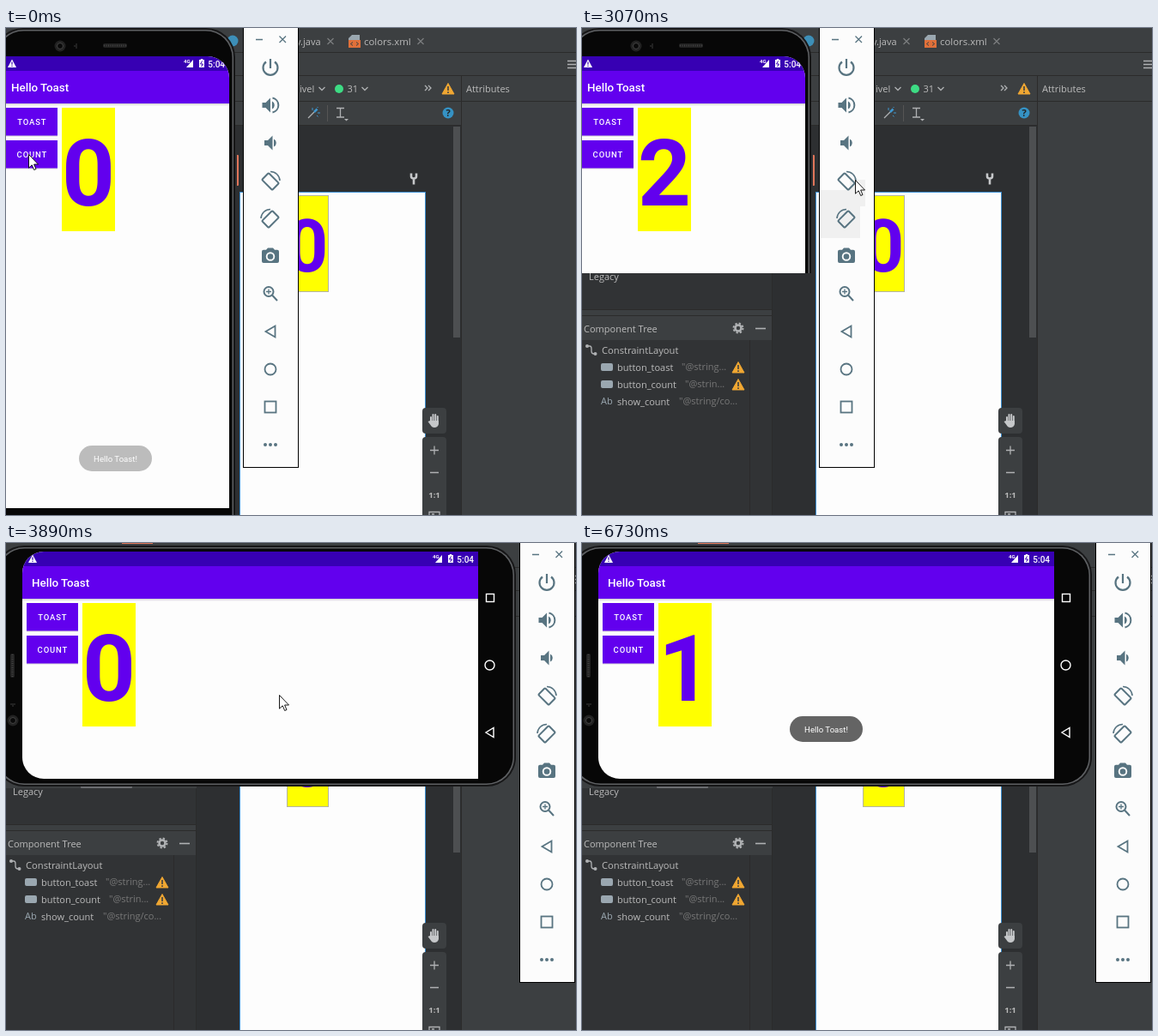
An HTML page that plays this animation: 664x568 px, repeating every 7720 ms.

```html
<!DOCTYPE html>
<html lang="en">
<head>
<meta charset="utf-8">
<title>Hello Toast</title>
<style>
@property --p { syntax: "<number>"; inherits: true; initial-value: 0; }
html, body { margin: 0; width: 100%; height: 100%; overflow: hidden; background: #2b2d30; }
svg { display: block; width: 664px; height: 568px; }
text { font-family: "Open Sans", "Noto Sans", sans-serif; font-size: 11px; fill: #bbb; }
text.app { font-family: Roboto, "Noto Sans", sans-serif; font-weight: 500; fill: #fff; }
text.title { font-size: 13.4px; }
text.btn { font-size: 9.5px; letter-spacing: .85px; text-anchor: middle; }
text.clock { font-size: 10px; text-anchor: end; }
text.net { font-size: 6px; font-weight: 700; }
text.note { font-size: 9.6px; font-weight: 400; text-anchor: middle; }
text.digit { font: 700 108px Roboto, "Noto Sans", sans-serif; fill: #6200ee; text-anchor: middle; }
text.dim { fill: #787878; }
.line { fill: none; stroke: #afb1b3; stroke-width: 1.3; }
.nav { fill: none; stroke: #fff; stroke-width: 1.4; }
.tool { fill: none; stroke: #587481; stroke-width: 2; }
.tool .solid { fill: #587481; stroke: none; }

/* every change is a hard step on one shared clock */
.a { animation: 7720ms step-end infinite; }
.cursor { animation-name: cursor; }
.upright { animation-name: upright; }
.sideways { animation-name: sideways; }
.settled { animation-name: settled; }
.turning { animation-name: turning, spin; }
.tree { animation-name: tree; }
.bar { animation-name: bar; }
.hover1 { animation-name: hover1; }
.hover2 { animation-name: hover2; }
.up0 { animation-name: up0; }
.up1 { animation-name: up1; }
.up2 { animation-name: up2; }
.side0 { animation-name: side0; }
.side1 { animation-name: side1; }
.press1 { animation-name: press1; }
.press2 { animation-name: press2; }
.press3 { animation-name: press3; }
.toast1 { animation-name: toast1; }
.toast2 { animation-name: toast2; }

.turn { transform: translate(297.5px, 141.5px) rotate(calc(-90deg * (1 - var(--p)))); }
.grow { transform: scale(calc(1 + 1.098 * var(--p)), calc(1 - .5234 * var(--p))); }
.shrink { transform: scale(calc(1 / (1 + 1.098 * var(--p))), calc(1 / (1 - .5234 * var(--p)))); }
.fade { opacity: calc(1 - var(--p)); }
.fade2 { opacity: calc((1 - var(--p)) * (1 - var(--p))); }

@keyframes cursor {
  0% { transform: translate(26px, 147px); visibility: visible; }
  12.17% { transform: translate(171px, 203px); }
  14.11% { transform: translate(278px, 226px); }
  16.06% { transform: translate(312px, 189px); }
  18% { transform: translate(318px, 177px); }
  58.16% { transform: translate(78px, 130px); }
  59.97% { transform: translate(45px, 123px); }
  68.65% { transform: translate(50px, 108px); }
  70.33% { transform: translate(53px, 92px); }
  78.23% { transform: translate(59px, 96px); }
  80.05% { transform: translate(250px, 240px); }
  81.73% { transform: translate(477px, 375px); }
  83.67% { transform: translate(515px, 460px); }
  85.23% { transform: translate(540px, 529px); visibility: visible; }
  87.17%, 100% { transform: translate(540px, 529px); visibility: hidden; }
}
@keyframes upright { 0% { visibility: visible; } 41.7%, 100% { visibility: hidden; } }
@keyframes sideways { 0% { visibility: hidden; } 41.7%, 100% { visibility: visible; } }
@keyframes turning { 0% { visibility: hidden; } 41.7% { visibility: visible; } 50.38%, 100% { visibility: hidden; } }
@keyframes settled { 0% { visibility: hidden; } 50.38%, 100% { visibility: visible; } }
@keyframes spin {
  0%, 41.7% { --p: 0; }
  45.33% { --p: .335; }
  47.27% { --p: .75; }
  48.83% { --p: .95; }
  50.38%, 100% { --p: 1; }
}
@keyframes tree { 0% { visibility: hidden; } 39.76%, 100% { visibility: visible; } }
@keyframes bar { 0% { transform: none; } 41.7%, 100% { transform: translate(322px, 0); } }
@keyframes hover1 { 0% { opacity: 0; } 16.06% { opacity: 1; } 41.7%, 100% { opacity: 0; } }
@keyframes hover2 { 0% { opacity: 0; } 18% { opacity: 1; } 41.7%, 100% { opacity: 0; } }
@keyframes up0 { 0% { opacity: 1; } 3.49%, 100% { opacity: 0; } }
@keyframes up1 { 0% { opacity: 0; } 3.49% { opacity: 1; } 8.29%, 100% { opacity: 0; } }
@keyframes up2 { 0% { opacity: 0; } 8.29%, 100% { opacity: 1; } }
@keyframes side0 { 0% { opacity: 1; } 64.89%, 100% { opacity: 0; } }
@keyframes side1 { 0% { opacity: 0; } 64.89%, 100% { opacity: 1; } }
@keyframes press1 { 0% { opacity: 0; } 1.55% { opacity: 1; } 3.49% { opacity: 0; } 6.73% { opacity: 1; } 8.29%, 100% { opacity: 0; } }
@keyframes press2 { 0% { opacity: 0; } 61.65% { opacity: 1; } 64.89%, 100% { opacity: 0; } }
@keyframes press3 { 0% { opacity: 0; } 74.35% { opacity: 1; } 78.23%, 100% { opacity: 0; } }
@keyframes toast1 {
  0% { opacity: .42; }
  1.55% { opacity: .8; }
  3.49% { opacity: 1; }
  25.51% { opacity: .6; }
  27.2% { opacity: .25; }
  29.14%, 100% { opacity: 0; }
}
@keyframes toast2 { 0% { opacity: 0; } 78.23% { opacity: .35; } 80.05% { opacity: .9; } 81.73%, 100% { opacity: 1; } }
</style>
</head>
<body>
<svg viewBox="0 0 664 568" width="664" height="568">
<defs>
  <linearGradient id="shade" x2="0" y2="1">
    <stop stop-color="#000" stop-opacity=".35"/><stop offset="1" stop-color="#000" stop-opacity="0"/>
  </linearGradient>
  <clipPath id="tallClip"><path d="M-5 560V33H235a25 25 0 0 1 25 25V560z"/></clipPath>
  <clipPath id="wideClip"><path d="M550 10H44a25 25 0 0 0-25 25V250a25 25 0 0 0 25 25H550z"/></clipPath>
  <clipPath id="glass"><rect x="19" y="10" width="556" height="265"/></clipPath>
  <clipPath id="oldClip"><rect x="-132.5" y="-278" width="265" height="556"/></clipPath>
  <clipPath id="newClip"><rect x="-278" y="-132.5" width="556" height="265"/></clipPath>

  <g id="alert"><path d="M0-6.5L7 6H-7z" fill="#f0a732" stroke="#f0a732" stroke-linejoin="round"/><path d="M0-3V2M0 3.2V5" stroke="#3c3f41" stroke-width="1.6"/></g>
  <path id="close" class="line" d="M-3.5-3.5l7 7m0-7l-7 7"/>
  <path id="chevron" class="line" d="M-3.5-2L0 1.5 3.5-2"/>

  <g id="status">
    <path d="M-50 13h8V4z" fill="#fff"/>
    <text class="app net" x="-53" y="8">4G</text>
    <path d="M-35 4h1.8V3h2.4v1h1.8v9h-6z" fill="#fff"/>
    <path d="M-31.5 5.500l-2 3.500h3l-2 3" stroke="#3700b3" fill="none"/>
    <text class="app clock" x="-5" y="12.500">5:04</text>
  </g>
  <g id="ui">
    <path d="M12 3.500L17 13H7z" fill="#fff"/><path d="M12 6.500v3.300m0 1v1.300" stroke="#3700b3" stroke-width="1.2"/>
    <text class="app title" x="11" y="41">Hello Toast</text>
    <rect x="70" y="60" width="62" height="144" fill="#ff0"/>
    <path d="M5 92h60v1.500H5zM5 130h60v1.500H5z" fill="#000" opacity=".14"/>
    <path d="M5 60h60v32.500H5zM5 98h60v32.500H5z" fill="#6200ee"/>
    <text class="app btn" x="35.400" y="79.800">TOAST</text>
    <text class="app btn" x="35.400" y="117.800">COUNT</text>
  </g>
  <g id="tall">
    <rect width="265" height="527" fill="#fdfdfd"/>
    <rect y="55" width="265" height="3" fill="url(#shade)" opacity=".5"/>
    <rect width="265" height="17" fill="#3700b3"/>
    <rect y="17" width="265" height="38" fill="#6200ee"/>
    <use href="#ui"/><use href="#status" x="265"/>
  </g>
  <g id="wide">
    <rect width="531" height="265" fill="#fdfdfd"/>
    <rect y="55" width="531" height="3" fill="url(#shade)" opacity=".5"/>
    <rect width="531" height="17" fill="#3700b3"/>
    <rect y="17" width="531" height="38" fill="#6200ee"/>
    <use href="#ui"/><use href="#status" x="531"/>
  </g>
  <g id="old" transform="translate(-132.500 -278)">
    <rect width="265" height="556"/>
    <use href="#tall"/>
    <text class="digit" x="101" y="174">2</text>
    <g class="nav"><rect x="206.500" y="538.500" width="9" height="9"/><circle cx="132.500" cy="543" r="5.500"/><path d="M58 537.500v11l-9-5.500z"/></g>
  </g>
  <rect id="shadow" width="60" height="5" fill="url(#shade)"/>
  <g id="toast">
    <rect width="85" height="30" rx="15" fill="#646464"/>
    <text class="app note" x="42.500" y="18.500">Hello Toast!</text>
  </g>
  <g id="phone">
    <rect x="267" y="148" width="4" height="36" rx="1" fill="#e0765a" clip-path="inset(0 0 0 2px)"/>
    <rect x="-16" y="100" width="4" height="60" rx="1" fill="#6a6c70"/>
    <rect x="-14" width="281" height="607" rx="34" fill="#161617"/>
    <rect x="-12" y="2" width="277" height="603" rx="32" fill="#5e6063"/>
    <rect x="-10.500" y="3.500" width="274" height="600" rx="31" fill="#070707"/>
    <rect x="113" y="18" width="28" height="5" rx="2" fill="#222"/>
    <path d="M114 20.500h26" stroke="#444" stroke-width="2" stroke-dasharray="1 1.500"/>
    <circle cx="63" cy="21" r="6.500" fill="#222"/><circle cx="63" cy="21" r="3.500" fill="#0a0a0a" stroke="#444"/>
    <path d="M79 21h2m1-3v6" stroke="#2b2b2b" stroke-width="1.500"/>
  </g>
</defs>

<!-- editor -->
<rect width="664" height="568" fill="#3c3f41"/>
<rect x="222" y="113" width="308" height="455" fill="#2d2f31"/>
<path d="M222 28.500H664M222 55.500H664M222 85.500H664M222 113.500H530M530.500 56V568" stroke="#2b2b2b" fill="none"/>
<circle cx="264" cy="15" r="6.500" fill="#3d8fb8"/>
<text x="338" y="20" font-size="11.300">y.java</text><use href="#close" x="378" y="15.500" opacity=".55"/>
<path d="M403 8h9v8h-13v-4z" fill="#9aa7b0"/><path d="M399 14h14v9h-14z" fill="#e0703a"/>
<path d="M404 16.500l-2.500 2 2.500 2m4-4l2.500 2-2.500 2" fill="none" stroke="#3c3f41"/>
<text x="417" y="20" style="font-size:11.400px">colors.xml</text><use href="#close" x="483" y="15.500" opacity=".55"/>
<path class="line" d="M654 38.500h10m-10 4h10m-10 4h10"/>
<text x="342" y="75">ivel</text><use href="#chevron" x="368" y="71"/>
<circle cx="388" cy="71" r="5" fill="#3ddc84"/>
<text x="397.500" y="75">31</text><use href="#chevron" x="418" y="71"/>
<path class="line" d="M488 67l3 3-3 3m4-6l3 3-3 3"/>
<use href="#alert" x="515" y="71"/>
<text x="536" y="75">Attributes</text>
<path class="line" d="M352 105l7-7" stroke-width="2"/><path d="M359 98l3.500-3.500" stroke="#3f97cf" stroke-width="2.500"/>
<path d="M357 93v3m6 3h3m-4 3l1.500 1.500M363 92v1" stroke="#3f97cf"/>
<path d="M374.500 90v19" stroke="#555"/>
<path class="line" d="M385 93.500h9m-4.500 0V104m-4.500 0h9" stroke-width="1.600"/><path d="M394 106h5l-2.500 2.500z" fill="#afb1b3"/>
<circle cx="515" cy="99" r="6.500" fill="#3592c4"/><text x="515" y="103" text-anchor="middle" style="fill:#222;font-weight:700">?</text>
<rect x="521" y="115" width="8" height="246" fill="#4d4f51"/>
<path d="M472 169.500v3.500q0 2.500 3 2.500t3-2.500v-3.500m-3 5v8" fill="none" stroke="#c5c7c9" stroke-width="2.600"/>
<rect x="272.500" y="191.500" width="216" height="400" fill="#fdfdfd" stroke="#3d8fd1"/>
<rect x="327.500" y="195.500" width="48" height="112" fill="#ff0" stroke="#b4b4a0"/>
<text class="digit" x="351" y="284" style="font-size:85px">0</text>
<rect x="485" y="443" width="28" height="30" rx="4" fill="#3c3f41"/>
<rect x="485" y="477" width="28" height="100" rx="4" fill="#3c3f41"/>
<path d="M495 461v-7m2.500 6v-9m2.700 9v-9m2.600 9v-7" stroke="#c5c7c9" stroke-width="2" stroke-linecap="round"/>
<path d="M494 458h10v4q-1 4-5 4-3 0-4.500-3l-3-4z" fill="#c5c7c9"/>
<path class="line" d="M494 492.500h10m-5-5v10M494 518.500h10" stroke-width="1.600"/>
<text x="499" y="548" text-anchor="middle" style="font-size:9.500px;font-weight:700">1:1</text>
<path class="line" d="M493 570v-5.500h12v5.500M496 567h3"/>

<!-- upright phone -->
<g class="a upright">
  <use href="#phone"/>
  <g clip-path="url(#tallClip)"><g transform="translate(-5 33)">
    <use href="#tall"/>
    <use href="#shadow" class="a press1" x="5" y="130.500"/>
    <text class="digit a up0" x="101" y="174">0</text>
    <text class="digit a up1" x="101" y="174">1</text>
    <text class="digit a up2" x="101" y="174">2</text>
  </g></g>
  <use href="#toast" class="a toast1" x="85" y="487"/>
</g>

<!-- component tree -->
<g class="a tree">
  <rect y="286" width="222" height="282" fill="#313335"/>
  <rect x="222" y="286" width="50" height="282" fill="#2d2f31"/>
  <rect y="328" width="221" height="36" fill="#3c3f41"/>
  <path d="M0 328.500H221M0 335.500H221M195.500 364V568M221.500 286V568" stroke="#2b2b2b"/>
  <text x="8" y="294">Legacy</text>
  <text x="2" y="355">Component Tree</text>
  <circle cx="182" cy="350" r="3.500" fill="none" stroke="#afb1b3" stroke-width="2.600"/>
  <circle cx="182" cy="350" r="5.500" fill="none" stroke="#afb1b3" stroke-width="2" stroke-dasharray="2.300 2.020"/>
  <path d="M202 350.500h12" stroke="#afb1b3" stroke-width="1.600"/>
  <path class="line" d="M6 371h3q2 0 2 3v3q0 3 3 3h2"/><circle cx="6" cy="371" r="2" fill="#afb1b3"/><circle cx="15.500" cy="380" r="2" fill="#afb1b3"/>
  <text x="23" y="380" style="font-size:11.200px">ConstraintLayout</text>
  <path d="M24 391h10q2 0 2 2v5q0 2-2 2H24q-2 0-2-2v-5q0-2 2-2zM24 411h10q2 0 2 2v5q0 2-2 2H24q-2 0-2-2v-5q0-2 2-2z" fill="#9aa7b0"/>
  <text x="41" y="400">button_toast</text><text class="dim" x="116" y="399">"@string...</text>
  <text x="41" y="420">button_count</text><text class="dim" x="120" y="419">"@strin...</text>
  <text x="22" y="439" style="fill:#9aa7b0">Ab</text><text x="41" y="440">show_count</text><text class="dim" x="113" y="439">"@string/co...</text>
  <use href="#alert" x="182" y="396"/><use href="#alert" x="182" y="416"/>
</g>

<!-- sideways phone -->
<g class="a sideways">
  <use href="#phone" transform="matrix(0 -1 1 0 -13 270)"/>
</g>
<g class="a settled">
  <g clip-path="url(#wideClip)"><g transform="translate(19 10)">
    <use href="#wide"/>
    <use href="#shadow" class="a press2" x="5" y="130.500"/>
    <use href="#shadow" class="a press3" x="5" y="92.500"/>
    <text class="digit a side0" x="101" y="174">0</text>
    <text class="digit a side1" x="101" y="174">1</text>
  </g></g>
  <g class="nav"><rect x="559.500" y="59.500" width="9" height="9"/><circle cx="563.500" cy="142.500" r="5.500"/><path d="M568 215.500v11l-9-5.500z"/></g>
  <use href="#toast" class="a toast2" x="242" y="202"/>
</g>

<!-- screen rotation: the old view turns, stretches and fades over the new one -->
<g class="a turning" clip-path="url(#glass)">
  <rect x="19" y="10" width="556" height="265"/>
  <g class="turn">
    <g class="grow" clip-path="url(#oldClip)"><use href="#old" class="fade2"/></g>
    <g class="grow" clip-path="url(#oldClip)">
      <g class="shrink" clip-path="url(#newClip)">
        <g transform="translate(-278 -132.500)"><use href="#wide"/><text class="digit" x="101" y="174">0</text></g>
        <g class="grow"><use href="#old" class="fade"/></g>
      </g>
    </g>
  </g>
</g>

<!-- emulator bar -->
<g class="a bar">
  <rect x="276.500" y="-1" width="64" height="513.500" fill="#fcfcfc" stroke="#000"/>
  <rect class="a hover1" x="278" y="189" width="46" height="56" fill="#f0f0f0"/>
  <rect class="a hover2" x="312" y="177" width="18" height="31" fill="#f0f0f0"/>
  <g class="tool" transform="translate(308 0)">
    <path d="M-17 13.500h8M10.500 9.500l7.500 7.500m0-7.500l-7.500 7.500" stroke-width="1.300"/>
    <path d="M0 36v11M-5 39.500a8.500 8.500 0 1 0 10 0" stroke-width="2.200"/>
    <path class="solid" d="M-9.500 87h4l5.500-5.500v17L-5.500 93h-4z"/>
    <path class="solid" d="M2 85.500a5 5 0 0 1 0 9z"/>
    <path d="M2.500 81.500a8.700 8.700 0 0 1 0 17"/>
    <path class="solid" d="M-7 131h4l5.500-5.500v17L-3 137h-4zM4 129.500a5 5 0 0 1 0 9z"/>
    <g transform="translate(0 178)"><g id="rotate">
      <rect x="-5.500" y="-8.500" width="11" height="17" rx="1" transform="translate(0 1) rotate(-45)"/>
      <path d="M0-10.500a11 11 0 0 1 11 10.500" stroke-width="1.600"/>
    </g></g>
    <use href="#rotate" transform="translate(0 222) scale(-1 1)"/>
    <path class="solid" d="M-3-9.500h6l2 2.200h3q2 0 2 2V6q0 2-2 2H-8q-2 0-2-2V-5.300q0-2 2-2h3z" transform="translate(0 266)"/>
    <circle cx="0" cy="266.500" r="4.300" stroke="#fcfcfc" stroke-width="1.900"/>
    <circle cx="-2" cy="307.500" r="5.500"/><path d="M2 311.500l6 6.500"/><path d="M-5 307.500h6m-3-3v6" stroke-width="1.300"/>
    <path d="M5.500 347.500v13l-11-6.500z" stroke-width="1.800"/>
    <circle cx="0" cy="398" r="6.500" stroke-width="1.800"/>
    <rect x="-6.500" y="435.500" width="13" height="13" stroke-width="1.800"/>
    <path d="M-6 486h0m6 0h0m6 0h0" stroke-width="4" stroke-linecap="round"/>
  </g>
</g>

<path class="a cursor" d="M.5.500V16.200L4.200 12.800 6.700 18.500 9 17.500 6.600 12H11.500z" fill="#fff" stroke="#000" stroke-width=".9"/>
</svg>
</body>
</html>
```
